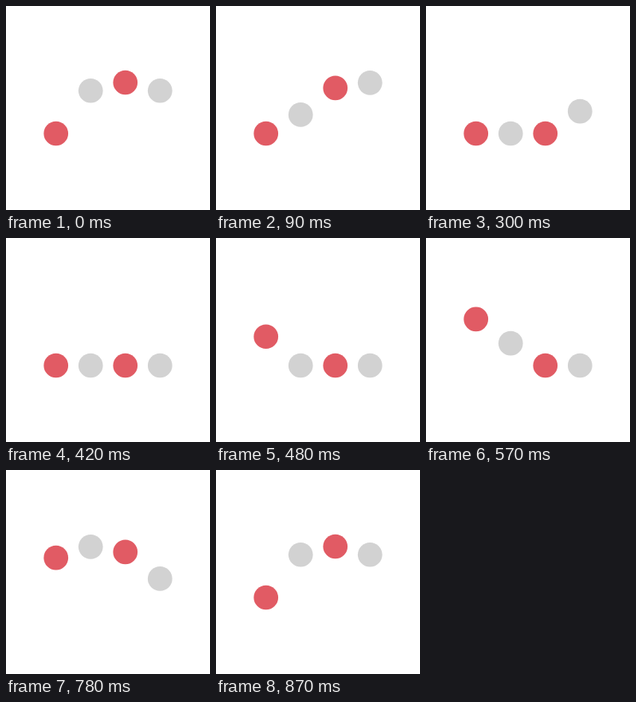
Animation, 256 px wide and 256 px high, one loop 0.9 s. Source, as an HTML page:

```html
<!DOCTYPE html>
<html lang="en">
<head>
<meta charset="utf-8">
<title>Bouncing dots</title>
<style>
  html, body { margin: 0; width: 100%; height: 100%; overflow: hidden; background: #fff; }
  svg { display: block; width: 100%; height: 100%; }
  .red { fill: #e15b64; }
  .grey { fill: #d2d2d2; }
</style>
</head>
<body>
<svg viewBox="0 0 100 100">
  <circle class="red" cx="24.5" cy="62.5" r="6"/>
  <circle class="grey" cx="41.5" cy="62.5" r="6"/>
  <circle class="red" cx="58.5" cy="62.5" r="6"/>
  <circle class="grey" cx="75.5" cy="62.5" r="6"/>
</svg>
<script>
  const STEP = 30, STEPS = 30;
  const FLOOR = 62.5, HEIGHT = 25;
  const dots = document.querySelectorAll('circle');

  // cubic-bezier(0.5, 0, 1, 0.5)
  function fall(p) {
    let lo = 0, hi = 1;
    for (let i = 0; i < 24; i++) {
      const s = (lo + hi) / 2, r = 1 - s;
      const x = 1.5 * r * r * s + 3 * r * s * s + s * s * s;
      if (x < p) lo = s; else hi = s;
    }
    return 1.5 * (1 - lo) * lo * lo + lo * lo * lo;
  }

  // Up in the first quarter, down in the second, then rest.
  function height(phase) {
    const p = Math.abs(phase - 0.25) * 4;
    return p < 1 ? HEIGHT * (1 - fall(p)) : 0;
  }

  // The last step of the loop repeats the first pose.
  function draw(ms) {
    const turn = Math.floor(ms / STEP) % STEPS / (STEPS - 1);
    dots.forEach((dot, i) => {
      const phase = (turn + 0.5 - i / 8) % 1;
      dot.setAttribute('cy', FLOOR - height(phase));
    });
  }

  let start;
  function tick(now) {
    start ??= now;
    draw(now - start);
    requestAnimationFrame(tick);
  }
  draw(0);
  requestAnimationFrame(tick);
</script>
</body>
</html>
```
